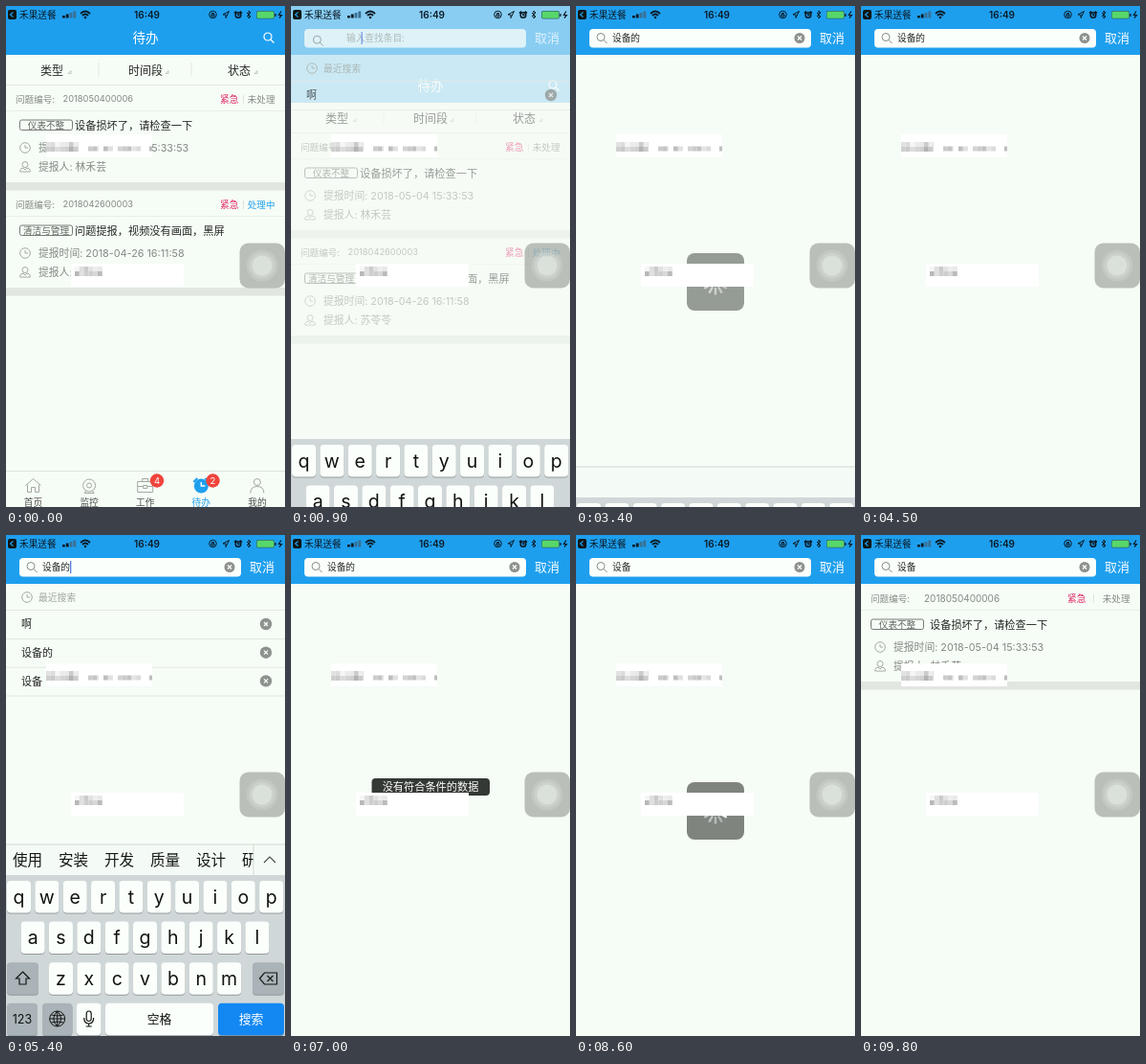
These frames come from a looping animation (292 by 523 pixels, 9900 ms). An HTML page with a canvas:

```html
<!DOCTYPE html>
<html lang="zh-CN">
<head>
<meta charset="utf-8">
<title>待办搜索</title>
<style>
html, body { margin: 0; width: 100%; height: 100%; overflow: hidden; background: #f6fcf6; }
canvas { display: block; }
</style>
</head>
<body>
<canvas id="stage" width="292" height="523"></canvas>
<script>
const ctx = document.getElementById('stage').getContext('2d');
const LOOP = 9900, W = 292, H = 523;
const BG = '#f6fcf6', BLUE = '#1e9fee', LINE = '#e3e8e3', GREY = '#858985', DARK = '#252825', BAND = '#e1e6e1';
const FONT = 'Inter, "Noto Sans CJK SC", "Noto Sans CJK", sans-serif';

// Motion tracks: [time, value] pairs, linear in between.
const KEYBOARD = [[600, 200], [900, 97], [1100, 0], [1600, 0], [1900, 200], [2600, 200], [2900, 0], [3200, 0],
  [3400, 158], [3500, 158], [3600, 200], [4900, 200], [5200, 6], [5300, 0], [6200, 0], [6500, 200],
  [7400, 200], [7700, 16], [7800, 3], [7900, 0], [8300, 0], [8600, 200]];
const SPINNER = [[1700, 0], [1900, .5], [2100, .5], [2300, 0], [3200, 0], [3400, .41], [3500, .41], [3600, .5],
  [3800, 0], [6300, 0], [6500, .5], [6700, .5], [6900, 0], [8400, 0], [8600, .5], [8900, .5], [9000, 0]];
const TOAST = [[1900, 0], [2100, 1], [2500, 1], [2800, 0], [3600, 0], [3800, 1], [4000, 1], [4500, 0],
  [6600, 0], [6800, 1], [7600, 1], [7800, .55], [8000, 0]];
const FADE = [[400, 0], [1300, 1]];
const FOCUS = [[400, 1600], [2600, 3200], [5000, 6200], [7400, 8300]];
const QUERY = [[0, ''], [1500, '啊'], [2700, ''], [2900, '设备'], [3100, '设备的'], [8100, '设备']];

function track(points, t) {
  if (t <= points[0][0]) return points[0][1];
  for (let i = 1; i < points.length; i++) {
    const [t0, v0] = points[i - 1], [t1, v1] = points[i];
    if (t <= t1) return v0 + (v1 - v0) * (t - t0) / (t1 - t0);
  }
  return points[points.length - 1][1];
}

function rect(x, y, w, h, color, radius = 0) {
  ctx.fillStyle = color;
  ctx.beginPath();
  ctx.roundRect(x, y, w, h, radius);
  ctx.fill();
}

// Text is centred vertically on cy.
function text(str, x, cy, size, color, align = 'left', weight = 400) {
  ctx.font = `${weight} ${size}px ${FONT}`;
  ctx.textAlign = align;
  ctx.fillStyle = color;
  ctx.fillText(str, x, cy + size * .375);
}

function disc(x, y, r, color) {
  ctx.fillStyle = color;
  ctx.beginPath();
  ctx.arc(x, y, r, 0, 7);
  ctx.fill();
}

// Strokes an SVG path placed at (x, y).
function icon(d, x, y, color, width = 1) {
  ctx.save();
  ctx.translate(x, y);
  ctx.strokeStyle = color;
  ctx.lineWidth = width;
  ctx.stroke(new Path2D(d));
  ctx.restore();
}

function faded(alpha, draw) {
  if (alpha <= 0) return;
  ctx.save();
  ctx.globalAlpha *= alpha;
  draw();
  ctx.restore();
}

const ring = r => `M${r} 0A${r} ${r} 0 1 1 ${-r} 0A${r} ${r} 0 1 1 ${r} 0`;
const CLOCK = ring(5.3) + 'M0-3V0H3';
const PERSON = 'M3-2.5A3 3 0 1 1-3-2.5A3 3 0 1 1 3-2.5M-5.3 5V3.5Q-5 1.5-2 1L0 3L2 1Q5 1.5 5.3 3.5V5Z';
const LENS = 'M3-1A4 4 0 1 1-5-1A4 4 0 1 1 3-1M2 2L5.5 5.5';
const CROSS = 'M-2-2L2 2M2-2L-2 2';

function closeButton(x, y, r) {
  disc(x, y, r, '#8d928f');
  icon(CROSS, x, y, '#fff', 1.2);
}

function statusBar() {
  rect(2, 4, 9, 10, '#101510', 2);
  icon('M1.5-2.5L-1.5 0L1.5 2.5', 6, 9, BLUE, 1.2);
  text('禾果送餐', 14, 9, 9.7, '#0b1a24');
  [2.5, 4, 5.5, 7].forEach((h, i) => rect(59 + i * 3.8, 12.5 - h, 2.8, h, i < 2 ? '#0b1a24' : '#3a6f92'));
  icon('M-5-1Q0-6 5-1M-3 1Q0-2 3 1', 83, 9, '#0b1a24', 1.8);
  disc(83, 12, 1.3, '#0b1a24');
  text('16:49', 147.5, 9, 10, '#0b1a24', 'center', 600);
  icon(ring(3.8) + 'M-1.5 0H1.5V2H-1.5ZM-1 0V-1.5H1V0', 216.5, 9, '#0b1a24');
  icon('M-3 0L3.5-3.5L0 3.5V0Z', 230, 9, '#0b1a24');
  icon(ring(2.8) + 'M0-1.5V0H1.5M-4-2L-2-4M4-2L2-4', 243, 9.5, '#0b1a24', 1.5);
  icon('M-2-2L2 2L0 4V-4L2-2L-2 2', 254, 9, '#0b1a24');
  rect(262, 5, 19, 8.5, '#2f6a6c', 2);
  rect(262.7, 5.7, 17.6, 7.1, '#57d769', 1.5);
  rect(281.3, 8, 1.3, 3, '#0b1a24');
  icon('M1-3.5L-1.5 .5H1.5L-1 3.5', 287, 9, '#0b1a24', 1.2);
}

function card(y, c, compact) {
  const tagX = compact ? 10.5 : 14.5, size = compact ? 10 : 9.3;
  text('问题编号:', 10, y, 9.6, GREY);
  text(c.id, compact ? 66 : 59.5, y, size, GREY);
  text('紧急', 224 - (compact ? 8 : 0), y, 9.7, '#e22a68');
  rect(compact ? 243 : 248, y - 4, 1, 9, '#dfe3df');
  text(c.state, 281.5, y, 9.6, c.stateColor, 'right');
  rect(0, y + 12, W, 1, '#e9eee9');
  ctx.strokeStyle = '#777b77';
  ctx.lineWidth = 1;
  ctx.beginPath();
  ctx.roundRect(tagX, y + 22, 55, 10.5, 2);
  ctx.stroke();
  text(c.tag, tagX + 27.5, y + 27.5, 9.6, '#606460', 'center');
  text(c.title, 72, y + 27.5, 11.2, DARK);
  icon(CLOCK, 20, y + 51, '#a5aaa5');
  text('提报时间: ' + c.time, 34, y + 51, 10.8, GREY);
  icon(PERSON, 20, y + 71, '#a5aaa5');
  text('提报人: ' + c.person, 34, y + 71, 10.8, GREY);
  rect(0, y + 87, W, 8.5, BAND);
}

const CARDS = [
  { id: '2018050400006', state: '未处理', stateColor: GREY, tag: '仪表不整', title: '设备损坏了，请检查一下',
    time: '2018-05-04 15:33:53', person: '林禾芸' },
  { id: '2018042600003', state: '处理中', stateColor: BLUE, tag: '清洁与管理', title: '问题提报，视频没有画面，黑屏',
    time: '2018-04-26 16:11:58', person: '苏苓苓' }
];

const TABS = [
  ['首页', 'M-8 0L0-7L8 0M-6-1V7H-2V2H2V7H6V-1'],
  ['监控', ring(6.5) + ring(2.5) + 'M-3 5L-5 8H5L3 5'],
  ['工作', 'M-8-4H8V7H-8ZM-3-4V-7H3V-4M-8 1H-2M2 1H8M-2 0H2V3H-2Z'],
  ['待办', ''],
  ['我的', 'M3.5-3.5A3.5 3.5 0 1 1-3.5-3.5A3.5 3.5 0 1 1 3.5-3.5M-7 8Q-7 1 0 1Q7 1 7 8']
];

function tabBar() {
  rect(0, 485, W, 38, BG);
  rect(0, 485, W, 1, '#dce1dc');
  TABS.forEach(([label, path], i) => {
    const x = 28.5 + i * 58.6, active = label === '待办';
    if (active) {
      disc(x, 501, 7.5, BLUE);
      icon('M0-4V0H4', x, 501, '#fff', 1.4);
      icon('M-8-4L-4-8M8-4L4-8', x, 501, BLUE, 2);
    } else icon(path, x, 500.5, '#a3a8a3');
    text(label, x, 518, 9.7, active ? BLUE : '#4d514d', 'center');
  });
  [[158, '4'], [216.5, '2']].forEach(([x, n]) => {
    disc(x, 495.5, 7.2, '#f0443c');
    text(n, x, 495.5, 9.5, '#fff', 'center');
  });
}

// While leaving, the page sits lower and its title bar fades ahead of the rest.
function listPage(p) {
  const shift = p > 0 ? 50 : 0;
  rect(0, 0, W, 51, BLUE);
  faded(1 - p, () => rect(0, 51, W, shift, BLUE));
  ctx.save();
  ctx.translate(0, shift);
  text('待办', 146, 33, 13.6, '#fff', 'center');
  icon(LENS, 275, 33, '#fff', 1.2);
  [[36, '类型', 65], [128, '时间段', 167], [232, '状态', 260]].forEach(([x, label, caret]) => {
    text(label, x, 67, 12, DARK);
    icon('M0 3L3 0V3Z', caret, 67.5, '#b9beb9', .8);
  });
  rect(96.5, 59, 1, 15, LINE);
  rect(193.5, 59, 1, 15, LINE);
  rect(0, 82, W, 1, LINE);
  card(97, CARDS[0]);
  card(207, CARDS[1]);
  ctx.restore();
  tabBar();
}

function searchHeader(query, focused, p) {
  const rest = 1 - p;
  rect(14, 24, 232, 19.5, '#fbfffb', 4);
  icon(LENS, 27 + 3 * rest, 33.5 + 6 * rest, '#858a87');
  if (query) {
    text(query, 38, 33.5, 9.7, DARK);
    closeButton(234, 33.5, 5.5);
  } else text('输入查找条目:', 38 + 45 * rest, 33, 9.7, '#a0a5a0');
  if (focused) rect(38 + query.length * 9.7 + 80 * rest, 27, 1.2, 13, '#4670dc');
  text('取消', 255, 33.5, 13, '#fff');
}

function historyList(items) {
  icon(CLOCK, 22, 65, '#a5aaa5');
  text('最近搜索', 34, 65, 9.8, '#a0a5a0');
  rect(0, 78, W, 1, LINE);
  items.forEach((item, i) => {
    const y = 93 + i * 29.7;
    text(item, 16, y, 11, DARK);
    closeButton(272, y, 6.2);
    rect(0, y + 15, W, 1, LINE);
  });
}

function suggestionWords() {
  ctx.save();
  ctx.beginPath();
  ctx.rect(0, 323, 259, 32);
  ctx.clip();
  ['使用', '安装', '开发', '质量', '设计', '研究'].forEach((w, i) => text(w, 7 + i * 48, 339, 15.6, '#151815'));
  ctx.restore();
  rect(258.5, 323, 1, 32, '#d3d9d4');
  icon('M-6 3L0-3L6 3', 276, 339, '#4b504d', 1.2);
}

function key(x, y, w, label, size = 19.5, fill = '#fbfffb', color = '#101310') {
  rect(x, y + 1, w, 33.5, '#939b9d', 4);
  rect(x, y, w, 33.5, fill, 4);
  text(label, x + w / 2, y + 16.5, size, color, 'center');
}

function keyboard(dy, hasText, focused) {
  if (dy >= 200) return;
  const special = '#a9b3b8', ink = '#151815';
  ctx.save();
  ctx.translate(0, dy);
  if (hasText) {
    rect(0, 323, W, 32, '#f4faf5');
    rect(0, 322.5, W, 1, '#d3d9d4');
    if (focused) suggestionWords();
  }
  rect(0, 355, W, 400, '#d0d7d8');
  [['qwertyuiop', 1], ['asdfghjkl', 15.6], ['zxcvbnm', 45]].forEach(([letters, x], row) =>
    [...letters].forEach((c, i) => key(x + i * 29.35, 361 + row * 42.6, 25, c)));
  key(1, 446.2, 33, '', 0, special);
  icon('M0-7L7 0H3.5V6H-3.5V0H-7Z', 17.5, 463, ink, 1.2);
  key(258, 446.2, 33, '', 0, special);
  icon('M-9 0L-4-6H9V6H-4ZM-1-3L5 3M5-3L-1 3', 274.5, 463, ink, 1.2);
  key(1, 488.8, 32, '123', 12.5, special);
  key(38, 488.8, 31.5, '', 0, special);
  icon(ring(8) + 'M0-8V8M-8 0H8M0-8Q-8 0 0 8M0-8Q8 0 0 8M-6.5-4Q0-2 6.5-4M-6.5 4Q0 2 6.5 4', 53.7, 505, ink);
  key(74, 488.8, 25.5, '');
  icon('M-2.5-5Q-2.5-8 0-8Q2.5-8 2.5-5V0Q2.5 2.5 0 2.5Q-2.5 2.5-2.5 0ZM-5-1Q-5 5 0 5Q5 5 5-1M0 5V8M-3 8H3', 86.7, 505, ink, 1.2);
  key(104, 488.8, 113, '空格', 12.8);
  key(222, 488.8, 69, '搜索', 12.8, '#1388f2', '#fff');
  ctx.restore();
}

function spinner(alpha, t) {
  if (alpha <= 0) return;
  rect(116, 258, 60, 60, `rgba(10,15,10,${alpha})`, 8);
  const step = t / 100 % 12;
  ctx.lineWidth = 2.4;
  ctx.lineCap = 'round';
  for (let i = 0; i < 12; i++) {
    const a = i * Math.PI / 6, fade = .4 + .6 * ((i - step + 12) % 12) / 12;
    ctx.strokeStyle = `rgba(255,255,255,${fade * alpha * 2})`;
    ctx.beginPath();
    ctx.moveTo(146 + 7 * Math.cos(a), 288 + 7 * Math.sin(a));
    ctx.lineTo(146 + 12.5 * Math.cos(a), 288 + 12.5 * Math.sin(a));
    ctx.stroke();
  }
  ctx.lineCap = 'butt';
}

function toast() {
  rect(84.5, 254, 123.5, 18, 'rgba(20,26,21,.86)', 4);
  text('没有符合条件的数据', 146, 263, 11.2, '#fff', 'center');
}

// Blurred patches that stay fixed on the screen.
function censor() {
  const blocks = (x0, x1, y, seed) => {
    for (let x = x0, i = 0; x < x1; x += 4.8, i++) {
      for (let row = 0; row < 2; row++) {
        const noise = Math.abs(Math.sin(seed + i * 12.9 + row * 78.2) * 43758.5) % 1;
        const v = 250 - Math.round(noise * 50 + row * 22);
        rect(x, y + row * 5, Math.min(4.8, x1 - x), 5, `rgb(${v},${v},${v})`);
      }
    }
  };
  rect(42, 134, 111, 24, '#fefffe');
  blocks(42, 76, 142, 1);
  [[86, 97], [102, 112], [117, 141], [150, 153]].forEach(([a, b]) => {
    for (let x = a; x < b; x += 4.8) {
      const v = 190 + Math.round(x * 7) % 42;
      rect(x, 146.5, Math.min(4.8, b - x), 5, `rgb(${v},${v},${v})`);
    }
  });
  rect(68, 269, 118, 24, '#fefffe');
  blocks(72, 101, 272, 5);
}

function assistButton() {
  rect(244.5, 247.5, 47.5, 47, 'rgba(137,142,137,.55)', 9);
  disc(268, 271, 16.5, 'rgba(225,231,225,.22)');
  disc(268, 271, 13.5, 'rgba(225,231,225,.3)');
  disc(268, 271, 10.5, 'rgba(235,241,235,.45)');
}

function render(t) {
  const p = track(FADE, t);
  const focused = FOCUS.some(([a, b]) => t >= a && t < b);
  const query = QUERY.filter(([start]) => t >= start).pop()[1];
  const history = t < 5000 ? ['啊'] : t < 5700 ? ['啊', '设备的', '设备'] : ['设备的', '设备'];

  rect(0, 0, W, H, BG);
  if (p < 1) listPage(p);
  faded(p, () => rect(0, 0, W, H, BG));
  faded(p * 2 - 1, () => rect(0, 0, W, 51, BLUE));
  faded(Math.sqrt(p), () => {
    searchHeader(query, focused, p);
    if (focused) historyList(history);
  });
  if (t >= 8700) card(66, CARDS[0], true);
  keyboard(track(KEYBOARD, t), query !== '', focused);
  spinner(track(SPINNER, t), t);
  faded(track(TOAST, t), toast);
  censor();
  assistButton();
  statusBar();
}

// The screen advances in 100 ms steps.
function tick() {
  render(Math.floor(performance.now() % LOOP / 100) * 100);
  requestAnimationFrame(tick);
}
tick();
</script>
</body>
</html>
```
